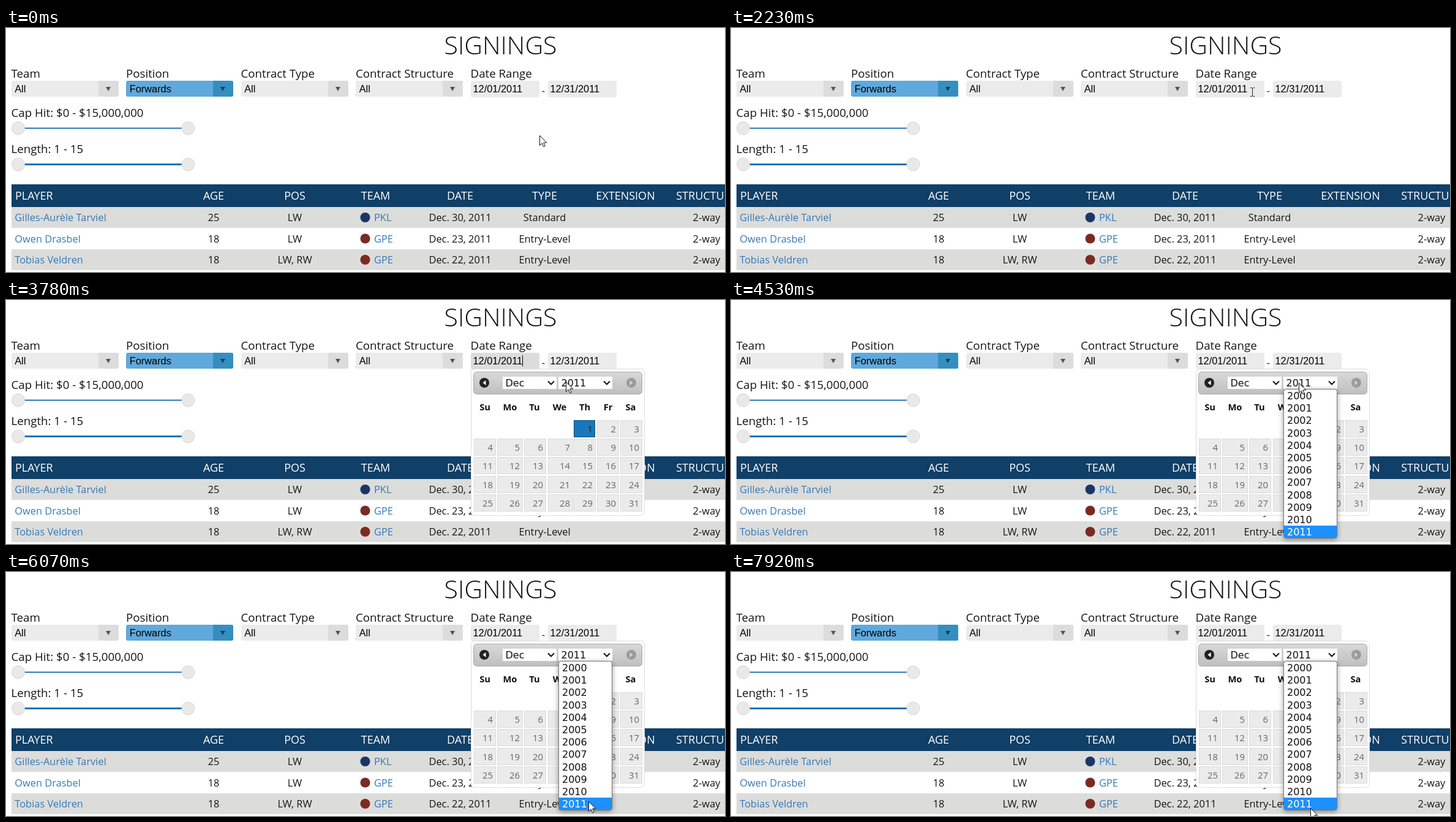
An HTML page that plays this animation: 1174 by 398 pixels, repeating every 7.99 s.

```html
<!DOCTYPE html>
<html lang="en">
<head>
<meta charset="utf-8">
<title>Signings</title>
<style>
  html, body { margin: 0; width: 100%; height: 100%; overflow: hidden; background: #fff; }
  svg { display: block; }
  text { font-family: "Open Sans", sans-serif; font-size: 16.4px; fill: #151515; white-space: pre; }
  .title { font-size: 41px; font-weight: 300; }
  .label { font-size: 18.72px; }
  .form { font-family: "Liberation Sans", Arial, sans-serif; font-size: 16.38px; fill: #000; }
  .head { font-size: 18px; fill: #fff; }
  .link { fill: #337ab7; }
  .week { font-size: 14.7px; font-weight: 700; fill: #111; }
  .day { font-size: 14.8px; fill: #666; }
  .pick { font-family: "DejaVu Sans", Verdana, sans-serif; font-size: 16px; fill: #111; }
  .mid { text-anchor: middle; }
  .end { text-anchor: end; }
  #list { filter: drop-shadow(0 2px 4px #0006); }
</style>
</head>
<body>
<svg id="stage" width="1174" height="398" viewBox="0 0 1174 398"></svg>
<script>
const LOOP = 7990;
const text = (x, y, s, cls = "") => `<text x="${x}" y="${y}" class="${cls}">${s}</text>`;
const rect = (x, y, w, h, fill, more = "") =>
  `<rect x="${x}" y="${y}" width="${w}" height="${h}" fill="${fill}" ${more}/>`;
const circle = (x, y, r, fill, more = "") => `<circle cx="${x}" cy="${y}" r="${r}" fill="${fill}" ${more}/>`;
const path = (d, fill, more = "") => `<path d="${d}" fill="${fill}" ${more}/>`;

function filters() {
  const labels = ["Team", "Position", "Contract Type", "Contract Structure", "Date Range"];
  return labels.map((label, i) => {
    const x = 8.5 + 187.5 * i, left = Math.round(x), on = i === 1;
    let out = text(x, 80.5, label, "label");
    if (i < 4) {
      out += rect(left, 86, 175, 26, on ? "#60a9dc" : "#ebebeb", 'rx="3"')
        + path(`M${left + 142} 86h30q3 0 3 3v20q0 3 -3 3h-30z`, on ? "#348fc1" : "#dcdcdc")
        + path(`M${left + 154} 96h8l-4 7z`, on ? "#1d3d55" : "#555")
        + text(x + 5.7, 105, on ? "Forwards" : "All", "form");
    }
    return out;
  }).join("");
}

function slider(y, label, thick) {
  const knob = x => circle(x, y, 10.5, "#e9e9e9", 'stroke="#d6d6d6"');
  return text(8.5, y - 19, label, "label")
    + rect(20, y - thick / 2, 277, thick, "#2273b5") + knob(20) + knob(297.5);
}

function table() {
  const cols = [339, 471.5, 603.5, 741.5, 879.5, 1011.5, 1144];
  const heads = ["AGE", "POS", "TEAM", "DATE", "TYPE", "EXTENSION", "STRUCTURE"];
  const rows = [
    ["Gilles-Aurèle Tarviel", 25, "LW", "PKL", "Dec. 30, 2011", "Standard"],
    ["Owen Drasbel", 18, "LW", "GPE", "Dec. 23, 2011", "Entry-Level"],
    ["Tobias Veldren", 18, "LW, RW", "GPE", "Dec. 22, 2011", "Entry-Level"]
  ];
  let out = rect(9, 255, 1165, 37, "#103f67") + text(15, 280, "PLAYER", "head")
    + heads.map((h, i) => text(cols[i], 280, h, "head mid")).join("");
  rows.forEach(([name, age, pos, team, date, type], i) => {
    const y = 315 + 34.5 * i;
    if (i !== 1) out += rect(9, i ? 361 : 292, 1165, 34, "#dcdcdb");
    out += text(14.3, y, name, "link") + text(cols[0], y, age, "mid") + text(cols[1], y, pos, "mid")
      + circle(586.5, y - 6, 8, i ? "#7a2a22" : "#1b3565") + text(601, y, team, "link")
      + text(cols[3], y, date, "mid") + text(cols[4], y, type, "mid") + text(cols[6], y, "2-way", "mid");
  });
  return out;
}

function calendar() {
  const cells = [[764, 799], [802, 843], [846, 881], [885, 925], [927, 962], [965, 1000], [1003, 1038]];
  const picker = (x, s) => rect(x, 125, 88, 20, "#fff") + text(x + 4.5, 141, s, "pick")
    + path(`M${x + 74} 132.5l5 5 5-5`, "none", 'stroke="#111" stroke-width="2"');
  let out = rect(759.5, 112.5, 283, 239, "#fff", 'rx="6" stroke="#dcdcdc"')
    + rect(763.5, 117.5, 275, 36, "url(#bar)", 'rx="5" stroke="#aaa"')
    + circle(781, 135, 8, "#222") + path("M783.5 131v8l-5-4z", "#fff")
    + circle(1021, 135, 8, "#9b9b9b") + path("M1018.5 131v8l5-4z", "#d4d4d4")
    + picker(811, "Dec") + picker(902, "2011");
  ["Su", "Mo", "Tu", "We", "Th", "Fr", "Sa"].forEach((d, i) => {
    out += text([782, 823, 863, 904, 945, 983, 1020][i], 180, d, "week mid");
  });
  for (let day = 1; day <= 31; day++) {
    const slot = day + 3, [l, r] = cells[slot % 7], y = 196 + Math.round(30.2 * Math.floor(slot / 7));
    const on = day === 1;
    out += rect(l + .5, y + .5, r - l - (on ? 1 : 0), 27, on ? "#1678bb" : "#ebebeb", `stroke="${on ? "#0d4f80" : "#dadada"}"`)
      + text(r - 4, y + 20, day, on ? "day end\" style=\"fill:#222" : "day end");
  }
  return out;
}

const rowTop = i => 146 + Math.round(20.2 * i);
function years() {
  let out = rect(902.5, 145.5, 87, 243, "#fff", 'rx="4" stroke="#777"') + rect(903, 0, 86, 20, "#1e90ff", 'id="mark"');
  for (let i = 0; i < 12; i++) out += text(908, rowTop(i) + 16, 2000 + i, "pick year");
  return out;
}

const field = (x, s, id) => rect(x, 86, 112, 27, "#ebebeb", `rx="3" id="${id}"`) + text(x + 3.5, 105, s, "form");

stage.innerHTML = `<defs><linearGradient id="bar" x2="0" y2="1">
    <stop stop-color="#d9d9d9"/><stop offset="1" stop-color="#bfbfbf"/></linearGradient></defs>`
  + text(807.5, 43, "SIGNINGS", "title mid") + filters()
  + field(759, "12/01/2011", "from") + text(874.8, 108, "-") + field(885, "12/31/2011", "to")
  + slider(163.5, "Cap Hit: $0 - $15,000,000", 2) + slider(222.5, "Length: 1 - 15", 3) + table()
  + `<g id="cal">${calendar()}</g><g id="list">${years()}</g>`
  + rect(843, 90, 1, 18, "#000", 'id="caret"')
  + path("M.5 .5V16.5L4.2 13 6.8 18.7 9.2 17.6 6.7 12H11.8Z", "#fff", 'stroke="#111" id="arrow"')
  + path("M-3 -7.5H-1L.5 -6.5 2 -7.5H4M.5 -6.5V5.5M-3 6.5H-1L.5 5.5 2 6.5H4", "none", 'stroke="#222" id="beam"');

const $ = id => document.getElementById(id);
const marks = [...document.querySelectorAll(".year")];

// Pointer path: time, x, y
const route = [
  [0, 871, 175], [1380, 871, 175], [1390, 868, 170], [1700, 860, 140], [2000, 853, 112], [2160, 851, 105],
  [3200, 851, 105], [3500, 875, 113], [3780, 914, 133], [3980, 927, 135], [4700, 927, 135],
  [4900, 938, 166], [5230, 953, 243], [5510, 952, 298], [5800, 951, 345], [6070, 951, 374],
  [6780, 951, 374], [7050, 949, 383], [7400, 948, 364], [7640, 947, 362], [7920, 946, 385], [LOOP, 946, 385]
];

function pointer(t) {
  const i = Math.max(1, route.findIndex(k => k[0] > t));
  const [t0, x0, y0] = route[i - 1], [t1, x1, y1] = route[i];
  const p = (t - t0) / (t1 - t0);
  return [Math.round(x0 + (x1 - x0) * p), Math.round(y0 + (y1 - y0) * p)];
}

const ramp = (t, start) => Math.min(1, Math.max(0, (t - start) / 200));
const show = (id, on) => $(id).setAttribute("visibility", on ? "visible" : "hidden");
const OPEN = 4290, FOCUS = 2460;

function draw(t) {
  const [x, y] = pointer(t);
  const inField = x < 871 && y < 113;
  for (const id of ["arrow", "beam"]) $(id).setAttribute("transform", `translate(${x} ${y})`);
  show("arrow", !inField);
  show("beam", inField);

  const grey = Math.round(235 - 15 * (ramp(t, 2230) - ramp(t, OPEN)));
  $("from").setAttribute("fill", `rgb(${grey},${grey},${grey})`);
  show("caret", t >= FOCUS && t < OPEN && (t - FOCUS) % 1000 < 500);
  $("cal").setAttribute("opacity", .5 - Math.cos(Math.PI * ramp(t, FOCUS + 5)) / 2);

  show("list", t >= OPEN);
  const row = y < 146 ? 11 : Math.min(11, Math.floor((y - 146) / 20.2));
  $("mark").setAttribute("y", rowTop(row));
  marks.forEach((m, i) => m.style.fill = i === row ? "#fff" : "#111");
}

function tick() {
  draw(performance.now() % LOOP);
  requestAnimationFrame(tick);
}
tick();
</script>
</body>
</html>
```
